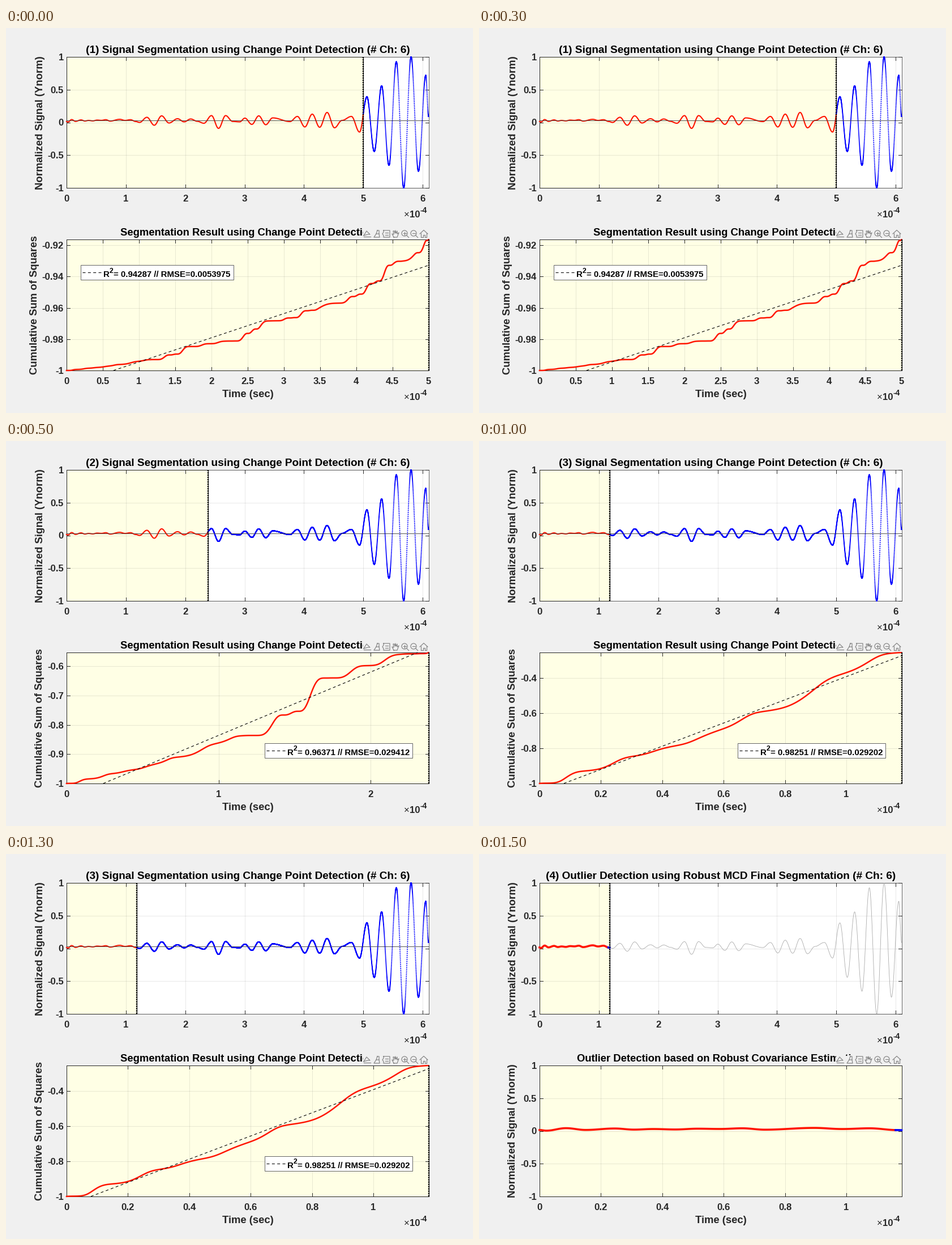
A matplotlib script for the animation above (2000 ms loop, 825 by 679 pixels).

```python
import numpy as np
import matplotlib.pyplot as plt
from matplotlib.animation import FuncAnimation
from matplotlib.patches import Circle, Rectangle

W, H, DPI = 825, 679, 100
PX = 72 / DPI                              # points per pixel
LEFT, RIGHT, TALL = 107, 746.5, 231        # panel edges and height
TOP_A, TOP_B = 51, 373
SPAN = 6.1                                 # time shown in the upper panel
UNIT = (RIGHT - LEFT) / SPAN
TICK, LABEL, TITLE, SMALL = 16.8, 18.45, 19.0, 15.0
INK, GREY, ICON = "#262626", "#666666", "#858585"
RED, BLUE, YELLOW, BACK = "#ff1400", "#0000ff", "#ffffe5", "#f0f0f0"
DASH = (0, (4.5, 4))

# Each burst swings between evenly spaced turning points: start, step, levels
BURSTS = [
    (0.000, 0.000, [0.015]),
    (0.022, 0.064, [0.005, 0.043, 0.016]),
    (0.245, 0.063, [0.038, 0.021, 0.030]),
    (0.442, 0.073, [0.023, 0.035, 0.031, 0.041, 0.020]),
    (0.896, 0.090, [0.047, 0.030, 0.041, 0.014]),
    (1.230, 0.124, [0, 0.078, -0.043, 0.1, -0.009]),
    (1.870, 0.111, [0.056, 0.009, 0.052, 0.017, -0.013]),
    (2.442, 0.119, [0.104, -0.091, 0.104, 0.015, 0.009]),
    (3.005, 0.117, [0.065, -0.03, 0.1, -0.035, 0.069]),
    (3.765, 0.125, [0.013, 0.091, -0.069, 0.126, -0.074, 0.152, -0.082]),
    (4.640, 0.160, [0.03, 0.091]),
    (4.937, 0.124, [-0.147, 0.39, -0.442, 0.558, -0.654,
                    0.926, -1, 1, -0.745, 0.719]),
    (SPAN, 0.000, [0.09]),
]


def make_signal(n=5000):
    """Cosine easing from one turning point to the next."""
    knots = [(t0 + i * dt, v) for t0, dt, levels in BURSTS
             for i, v in enumerate(levels)]
    kt, kv = np.array(knots).T
    t = np.linspace(0, SPAN, n)
    place = np.interp(t, kt, np.arange(len(kt)))
    k = np.minimum(place.astype(int), len(kt) - 2)
    ease = (1 - np.cos(np.pi * (place - k))) / 2
    return t, kv[k] + (kv[k + 1] - kv[k]) * ease


T, V = make_signal()
ENERGY = np.cumsum(V ** 2)

SIGNAL, SQUARES = "Normalized Signal (Ynorm)", "Cumulative Sum of Squares"
SEGMENT = dict(title="Signal Segmentation using Change Point Detection",
               sub="Segmentation Result using Change Point Detection",
               name=SQUARES, name_x=64.3)
STEPS = [
    dict(SEGMENT, name_x=55.3, end=5.0, rise=0.0837, xstep=0.5, ystep=0.02,
         legend=(132, 418, 269.5, "0.94287", "0.0053975")),
    dict(SEGMENT, end=2.38, rise=0.4468, xstep=1, ystep=0.1,
         legend=(456.5, 533, 261, "0.96371", "0.029412")),
    dict(SEGMENT, end=1.18, rise=0.745, xstep=0.2, ystep=0.2,
         legend=(456.5, 533, 261, "0.98251", "0.029202")),
    dict(title="Outlier Detection using Robust MCD Final Segmentation",
         sub="Outlier Detection based on Robust Covariance Estimation",
         name=SIGNAL, name_x=64.3, end=1.18, rise=2, xstep=0.2, ystep=0.5),
]

plt.rcParams["path.simplify"] = False
fig = plt.figure(figsize=(W / DPI, H / DPI), dpi=DPI, facecolor=BACK)
ax = fig.add_axes([0, 0, 1, 1])


def put(x, y, text, size, ha="left", color=INK, weight="bold", angle=0, z=3):
    ax.text(x, y, text, fontsize=size * PX, family="Liberation Sans",
            weight=weight, color=color, ha=ha, va="baseline",
            rotation=angle, rotation_mode="anchor", zorder=z)


def line(x, y, color=INK, width=1.0, z=2.0, **kw):
    ax.plot(x, y, color=color, lw=width * PX, zorder=z, **kw)


def rect(x, y, w, h, face, edge="none", z=1.0):
    ax.add_patch(Rectangle((x, y), w, h, fc=face, ec=edge, lw=PX, zorder=z))


def dotted(x, top):
    line([x, x], [top, top + TALL], "black", 2.4, 2.7,
         linestyle=(0, (1.0, 0.67)), dash_capstyle="butt")


def dots(x, y, color, size):
    """Tiny round-capped strokes, one per sample."""
    gap = np.full_like(x, np.nan)
    line(np.c_[x, x + 0.02, gap].ravel(), np.c_[y, y, gap].ravel(),
         color, size, 2.2, solid_capstyle="round")


def level(v, top):
    return top + TALL * (1 - v) / 2


def panel(top, xmax, xstep, rise, ystep, shade_to):
    """Background, grid, inward ticks, frame and tick labels."""
    bottom = top + TALL
    rect(LEFT, top, RIGHT - LEFT, TALL, "white", GREY, 0.5)
    rect(LEFT, top, shade_to - LEFT, TALL, YELLOW, INK)
    for v in np.arange(0, xmax + 0.01, xstep):
        x = LEFT + (RIGHT - LEFT) * v / xmax
        line([x, x], [top, bottom], INK, 1, 1.5, alpha=0.1)
        line([x, x], [bottom, bottom - 6], z=1.6)
        line([x, x], [top, top + 6], z=1.6)
        put(x, bottom + 23.5, f"{v:g}", TICK, "center")
    for v in np.arange(0, rise + 0.001, ystep):
        y = bottom - TALL * v / rise
        line([LEFT, RIGHT], [y, y], INK, 1, 1.5, alpha=0.1)
        line([LEFT, LEFT + 6], [y, y], z=1.6)
        line([RIGHT, RIGHT - 6], [y, y], z=1.6)
        put(102, y + 6, f"{round(v - 1, 6):g}", TICK, "right")
    put(703, bottom + 51.5, "×", TICK, weight="normal")
    put(713, bottom + 51.5, "10", TICK)
    put(732, bottom + 44, "-4", 14)


def legend(x, y, w, r2, rmse):
    rect(x, y, w, 25.5, "white", GREY, 3)
    line([x + 3, x + 37], [y + 13, y + 13], "black", 1.1, 4, linestyle=DASH)
    put(x + 40, y + 20.7, "R", SMALL, color="black", z=4)
    put(x + 51, y + 13.5, "2", 12.2, color="black", z=4)
    put(x + 58.5, y + 20.7, f"= {r2} // RMSE={rmse}", SMALL, color="black", z=4)


def toolbar():
    rect(630.5, 355.5, 117, 16.5, BACK, z=5)

    def stroke(cx, *points):
        x, y = np.array(points).T
        line(cx + x, 363 + y, ICON, 1.2, 6)

    stroke(638, (-6, 3), (-1, -5), (5, 1), (1, 1), (-6, 3))      # export
    stroke(638, (-6, 5), (6, 5))
    stroke(655, (1, -6), (-1, 0), (4, 0), (4, -6), (1, -6))      # brush
    stroke(655, (-1, 0), (-5, 6), (5, 6), (4, 0))
    stroke(672, (-5, -6), (6, -6), (6, 6), (-5, 6), (-5, 3),     # data tip
           (-7, 0), (-5, -3), (-5, -6))
    for dy in (-2, 2):
        stroke(672, (-2, dy), (3, dy))
    stroke(688, (-3, 6), (-6, 0), (-3, 1), (-4, -5), (-2, -5),   # hand
           (-1, -1), (0, -6), (1, -1), (3, -5), (3, 0), (6, -2), (3, 6), (-3, 6))
    for cx in (704, 720):                                        # zoom
        ax.add_patch(Circle((cx, 362), 5, fc="none", ec=ICON, lw=1.2 * PX, zorder=6))
        stroke(cx, (3.5, 2.5), (7.5, 6.5))
        stroke(cx, (-2.5, -1), (2.5, -1))
    stroke(704, (0, -3.5), (0, 1.5))
    stroke(738, (-7, 0), (0, -6.5), (7, 0))                      # home
    stroke(738, (-5, -1), (-5, 6), (-1.5, 6), (-1.5, 2), (1.5, 2),
           (1.5, 6), (5, 6), (5, -1))


def draw_segments(x, zoom_x, head, step):
    """Split signal above, its running energy and straight fit below."""
    y = level(V, TOP_A)
    line(x[head], y[head], RED, 2.1, 2.2)
    dots(x[~head], y[~head], BLUE, 2.1)
    line([LEFT, RIGHT], [163, 163], "#404040", 0.9, 2.4)

    zx, bottom = zoom_x[head], TOP_B + TALL
    total = bottom - TALL * ENERGY[head] / ENERGY[head][-1]
    line(zx, total, RED, 2.5, 2.2)
    fit = np.polyval(np.polyfit(zx, total, 1), zx)
    seen = (fit <= bottom) & (fit >= TOP_B)
    line(zx[seen], fit[seen], "black", 1.1, 2.3, linestyle=DASH)
    dotted(RIGHT, TOP_B)
    legend(*step["legend"])


def draw_outliers(x, zoom_x, head, step):
    """Faint full signal, with the kept part bold and its outliers blue."""
    line(x, level(V, TOP_A), "#a6a6a6", 0.8)
    kept = T <= step["end"] - 0.02
    for part, color in ((kept, RED), (head & ~kept, BLUE)):
        line(x[part], level(V[part], TOP_A), color, 3.6, 2.2)
        line(zoom_x[part], level(V[part], TOP_B), color, 3.6, 2.2)


def draw(i):
    step = STEPS[i]
    end = step["end"]
    split = LEFT + end * UNIT
    ax.clear()
    ax.axis("off")
    ax.set_xlim(0, W)
    ax.set_ylim(H, 0)

    panel(TOP_A, SPAN, 1, 2, 0.5, split)
    put(427, 44.5, f"({i + 1}) {step['title']} (# Ch: 6)", TITLE, "center", "black")
    put(64.8, 167, SIGNAL, LABEL, "center", angle=90)
    dotted(split, TOP_A)

    panel(TOP_B, end, step["xstep"], step["rise"], step["ystep"], RIGHT)
    put(427, 366, step["sub"], LABEL, "center", "black")
    put(step["name_x"], 488.5, step["name"], LABEL, "center", angle=90)
    put(427, 651, "Time (sec)", LABEL, "center")
    toolbar()

    paint = draw_segments if "legend" in step else draw_outliers
    paint(LEFT + T * UNIT, LEFT + T * (RIGHT - LEFT) / end, T <= end, step)


anim = FuncAnimation(fig, draw, frames=len(STEPS), interval=500,
                     repeat=True, repeat_delay=0)
plt.show()
```
